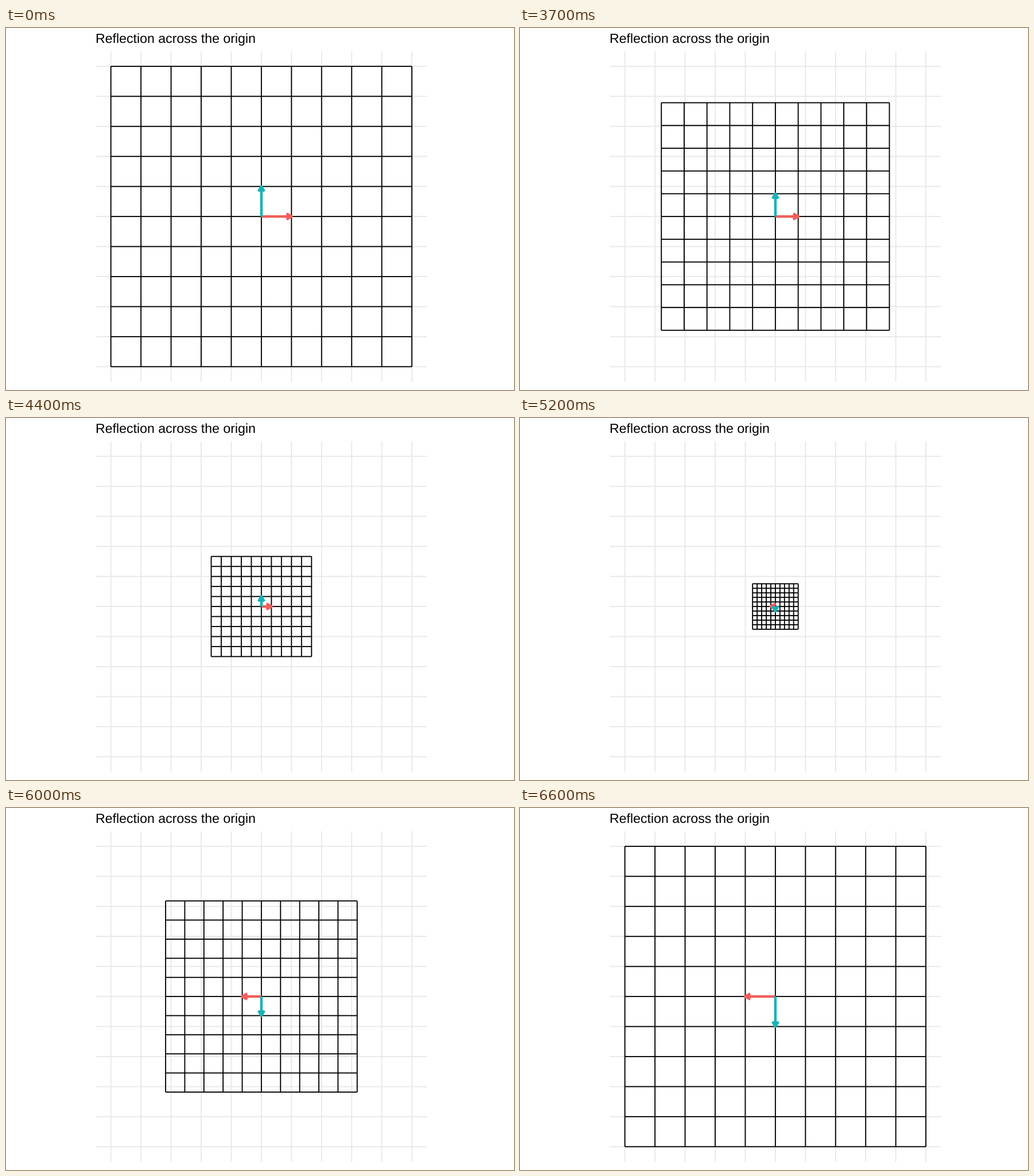
A matplotlib script that plays this animation: 885x632 px, repeating every 10 s.

```python
import numpy as np
import matplotlib.pyplot as plt
from matplotlib.animation import FuncAnimation
from matplotlib.collections import LineCollection

WIDTH, HEIGHT, DPI = 885, 632, 100
PX = 72 / DPI                       # one pixel in points
CENTER = np.array([444.9, 329.1])
UNIT = 52.44
REACH = 5.5 * UNIT                  # half the panel side
THIN, THICK = 1.87, 4.5
HEAD = 10.0

FRAMES, INTERVAL = 100, 100
START, STEPS = 33, 33               # the move begins after frame START

plt.rcParams["text.hinting"] = "no_hinting"
plt.rcParams["path.simplify"] = False

fig = plt.figure(figsize=(WIDTH / DPI, HEIGHT / DPI), dpi=DPI, facecolor="white")
ax = fig.add_axes([0, 0, 1, 1])
ax.set_xlim(0, WIDTH)
ax.set_ylim(HEIGHT, 0)
ax.axis("off")


def lattice(spacing, half):
    """Eleven vertical and eleven horizontal segments around the center."""
    offsets = np.arange(-5, 6) * spacing
    vertical = [[(d, -half), (d, half)] for d in offsets]
    horizontal = [[(-half, d), (half, d)] for d in offsets]
    return np.array(vertical + horizontal) + CENTER


def add_lines(color, width, zorder):
    lines = LineCollection([], colors=color, linewidths=width * PX,
                           capstyle="butt", joinstyle="round", zorder=zorder)
    lines.set_snap(False)
    return ax.add_collection(lines, autolim=False)


def arrow(direction, scale):
    """Shaft and open head of a basis vector; the head keeps its size."""
    tip = CENTER + np.array(direction) * UNIT * scale
    along = np.array(direction) * np.sign(scale)
    across = np.array([-along[1], along[0]])
    back = tip - along * HEAD * np.cos(np.pi / 6)
    side = across * HEAD * np.sin(np.pi / 6)
    return [np.array([CENTER, tip]), np.array([back + side, tip, back - side])]


add_lines("#E8E8E8", THIN, 1).set_segments(lattice(UNIT, REACH))
grid = add_lines("black", THIN, 2)
x_arrow = add_lines("#F35E5A", THICK, 3)
y_arrow = add_lines("#17B3B7", THICK, 4)

ax.text(CENTER[0] - REACH, 26.1, "Reflection across the origin",
        family="Liberation Sans", size=23.18 * PX, color="black",
        ha="left", va="baseline")


def update(frame):
    step = np.clip(frame - START, 0, STEPS)
    scale = 1 - 2 * step / STEPS
    grid.set_segments(lattice(UNIT * scale, 5 * UNIT * scale))
    x_arrow.set_segments(arrow((1, 0), scale))
    y_arrow.set_segments(arrow((0, -1), scale))
    return grid, x_arrow, y_arrow


anim = FuncAnimation(fig, update, frames=FRAMES, interval=INTERVAL,
                     repeat=True, repeat_delay=0, blit=False)
plt.show()
```
